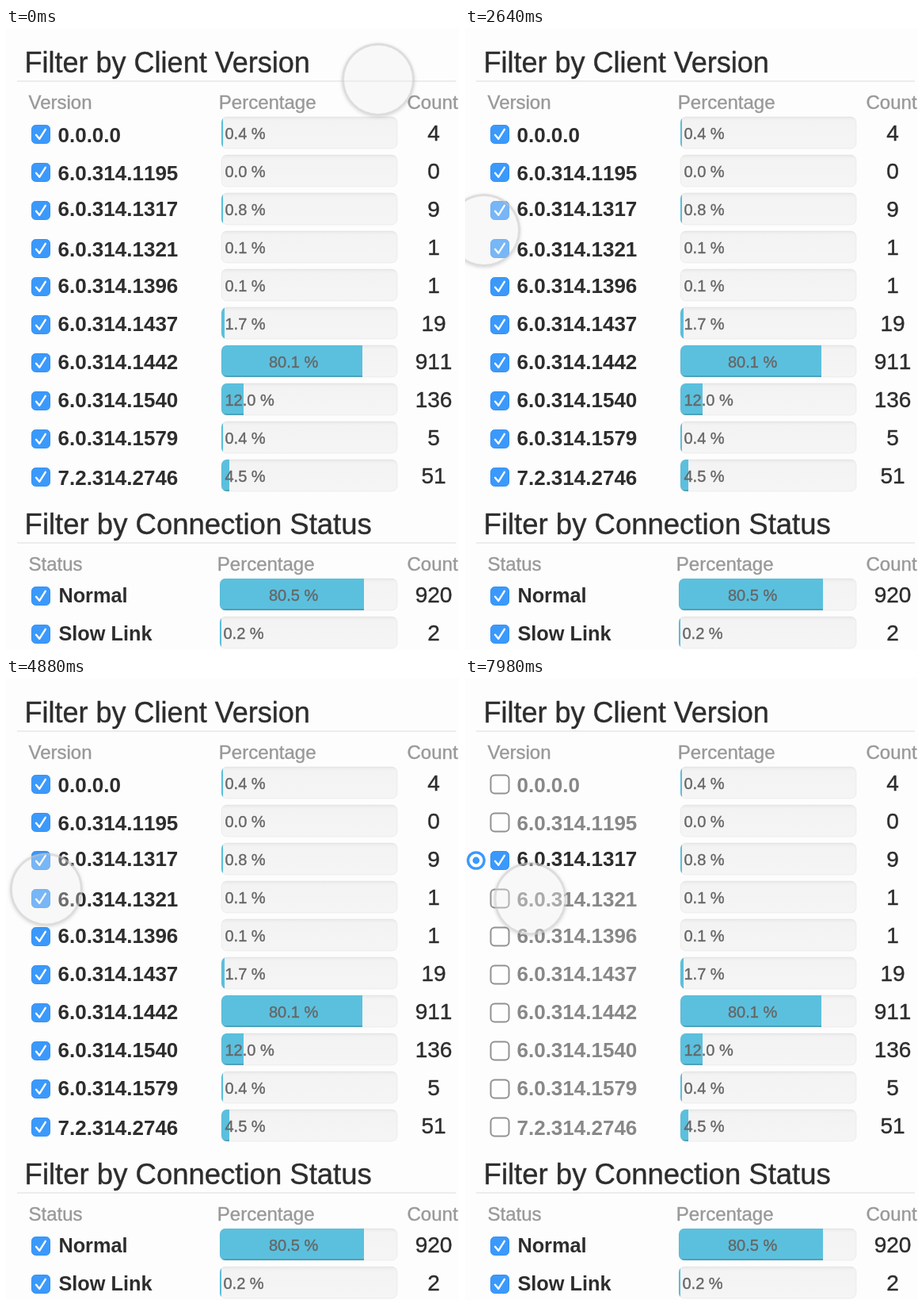
Recreate the animation shown at these times as an HTML page. Size 572 by 784 pixels, loop 8000 ms.

```html
<!DOCTYPE html>
<html lang="en">
<head>
<meta charset="utf-8">
<title>Filter panel</title>
<style>
  html, body { margin: 0; width: 572px; height: 784px; overflow: hidden; background: #fdfdfd; }
  body { position: relative; }
  svg { display: block; font-family: "Liberation Sans", Arial, sans-serif; }
  text { color: #2d2d2d; fill: currentColor; stroke: currentColor; stroke-width: .4; }
  .head { font-size: 24px; color: #999; }
  .name { font-weight: bold; font-kerning: none; stroke-width: 0; }
  .percent { font-size: 20px; color: #666; }
  .count { font-size: 28px; text-anchor: middle; font-kerning: none; }
  .box { fill: #3b99fc; stroke: #3490f4; stroke-width: 1; }
  .tick { fill: none; stroke: #fff; stroke-width: 2.4; stroke-linecap: round; stroke-linejoin: round; }
  .off .box { fill: #fefefe; stroke: #929292; stroke-width: 2; }
  .off .tick { display: none; }
  .off .name { color: #888; }
  #cursor {
    position: absolute; left: -46px; top: -46px; width: 92px; height: 92px; box-sizing: border-box;
    border: 3px solid rgba(205, 205, 205, .65); border-radius: 50%;
    background-clip: padding-box; box-shadow: 0 1px 4px rgba(0, 0, 0, .14);
  }
</style>
</head>
<body>
<svg id="panel" width="572" height="784"></svg>
<div id="cursor"></div>
<script>
const panel = document.getElementById('panel');
const cursor = document.getElementById('cursor');

// name, percentage, count, vertical nudge of the name
const versions = [
  ['0.0.0.0', 0.4, 4, 2], ['6.0.314.1195', 0, 0, 2], ['6.0.314.1317', 0.8, 9, -1],
  ['6.0.314.1321', 0.1, 1, 2], ['6.0.314.1396', 0.1, 1, 0], ['6.0.314.1437', 1.7, 19, 0],
  ['6.0.314.1442', 80.1, 911, 0], ['6.0.314.1540', 12, 136, 0], ['6.0.314.1579', 0.4, 5, 0],
  ['7.2.314.2746', 4.5, 51, 2],
];
const statuses = [['Normal', 80.5, 920, 0], ['Slow Link', 0.2, 2, 0]];
const SELECTED = 2;

function row([name, percent, count, nudge], i, barX, nameX, nameSize) {
  // Bars grow in steps of two pixels
  const width = 494 - barX, filled = percent < 0.2 ? 0 : Math.ceil(width * percent / 200) * 2;
  const labelX = percent > 50 ? barX + filled / 2 - 29 : barX + 4.5;
  const track = `x="${barX}" y="112" width="${width}" height="40" rx="7"`;
  return `<g class="row" transform="translate(0 ${i * 48})">
    <rect class="box" x="32.5" y="122.5" width="23" height="23" rx="5"/>
    <path class="tick" d="M38 134.8l4.2 5 7.6-12"/>
    <text class="name" x="${nameX}" y="${142 + nudge}" font-size="${nameSize}">${name}</text>
    <rect ${track} fill="url(#track)"/>
    <g clip-path="url(#clip${barX})">
      <rect x="${barX}" y="112" width="${filled}" height="40" fill="#5bc0de"/>
      <rect x="${barX}" y="150" width="${filled}" height="2" fill="#000" opacity=".15"/>
    </g>
    <rect ${track} fill="none" stroke="#000" stroke-opacity=".05"/>
    <text class="percent" x="${labelX}" y="139.5">${percent.toFixed(1)} %</text>
    <text class="count" x="540" y="142">${count}</text>
  </g>`;
}

function section(y, title, titleSize, label, rows, barX, nameX, nameSize) {
  return `<g transform="translate(0 ${y})">
    <clipPath id="clip${barX}"><rect x="${barX}" y="112" width="${494 - barX}" height="40" rx="7"/></clipPath>
    <text x="23.6" y="56" font-size="${titleSize}">${title}</text>
    <rect x="14" y="66" width="554" height="2" fill="#ececec"/>
    <text class="head" x="28.5" y="102">${label}</text>
    <text class="head" x="${barX - 3.2}" y="102">Percentage</text>
    <text class="head" x="506.5" y="102">Count</text>
    ${rows.map((r, i) => row(r, i, barX, nameX, nameSize)).join('')}
  </g>`;
}

panel.innerHTML = `<defs><linearGradient id="track" x2="0" y2="1">
    <stop offset="0" stop-color="#e9e9e9"/><stop offset=".12" stop-color="#f3f3f3"/>
    <stop offset="1" stop-color="#f5f5f5"/></linearGradient></defs>`
  + section(0, 'Filter by Client Version', 36, 'Version', versions, 272, 65.5, 26)
  + section(582, 'Filter by Connection Status', 36.5, 'Status', statuses, 270, 66.4, 25.3)
  + `<g id="radio"><circle cx="14" cy="230" r="10.2" fill="#fff" stroke-width="3.3"/>
     <circle cx="14" cy="230" r="4.4"/></g>`;

const radio = document.getElementById('radio');
const [ring, dot] = radio.children;
const rows = [...panel.querySelectorAll('.row')].slice(0, versions.length);

// time, x, y of the pointer
const path = [
  [0, 470, 65], [1200, 470, 65], [1900, 120, 207], [2120, 120, 228], [2640, 24, 255],
  [2920, 24, 255], [3240, 16, 229], [3920, 16, 229], [4240, 145, 357], [4580, 145, 357],
  [5040, 15, 232], [7740, 15, 232], [8220, 149, 324],
];
const LOOP = 8000, PRESS = 6520, CLICK = 6700;
const clamp = v => Math.min(1, Math.max(0, v));
const ease = u => u * u * (3 - 2 * u);

function pointerAt(t) {
  const k = path.findIndex(p => p[0] > t);
  const [t0, x0, y0] = path[k - 1], [t1, x1, y1] = path[k];
  const u = ease((t - t0) / (t1 - t0));
  return [x0 + (x1 - x0) * u, y0 + (y1 - y0) * u];
}

function draw(t) {
  const [x, y] = pointerAt(t);
  const press = t < PRESS ? 0 : 1 - clamp((t - 6860) / 140);
  cursor.style.transform = `translate(${x}px, ${y}px) scale(${1 - 0.05 * press})`;
  cursor.style.backgroundColor = `rgba(238, 238, 238, ${0.34 + 0.2 * press})`;

  const clicked = t >= CLICK;
  const hovered = Math.hypot(x - 14, y - 230) < 14;
  const color = clicked ? '#3b99fc' : '#999';
  radio.style.display = clicked || hovered ? '' : 'none';
  ring.style.stroke = color;
  dot.style.fill = color;
  rows.forEach((el, i) => el.classList.toggle('off', clicked && i !== SELECTED));
}

const start = performance.now();
function frame() {
  draw((performance.now() - start) % LOOP);
  requestAnimationFrame(frame);
}
frame();
</script>
</body>
</html>
```
